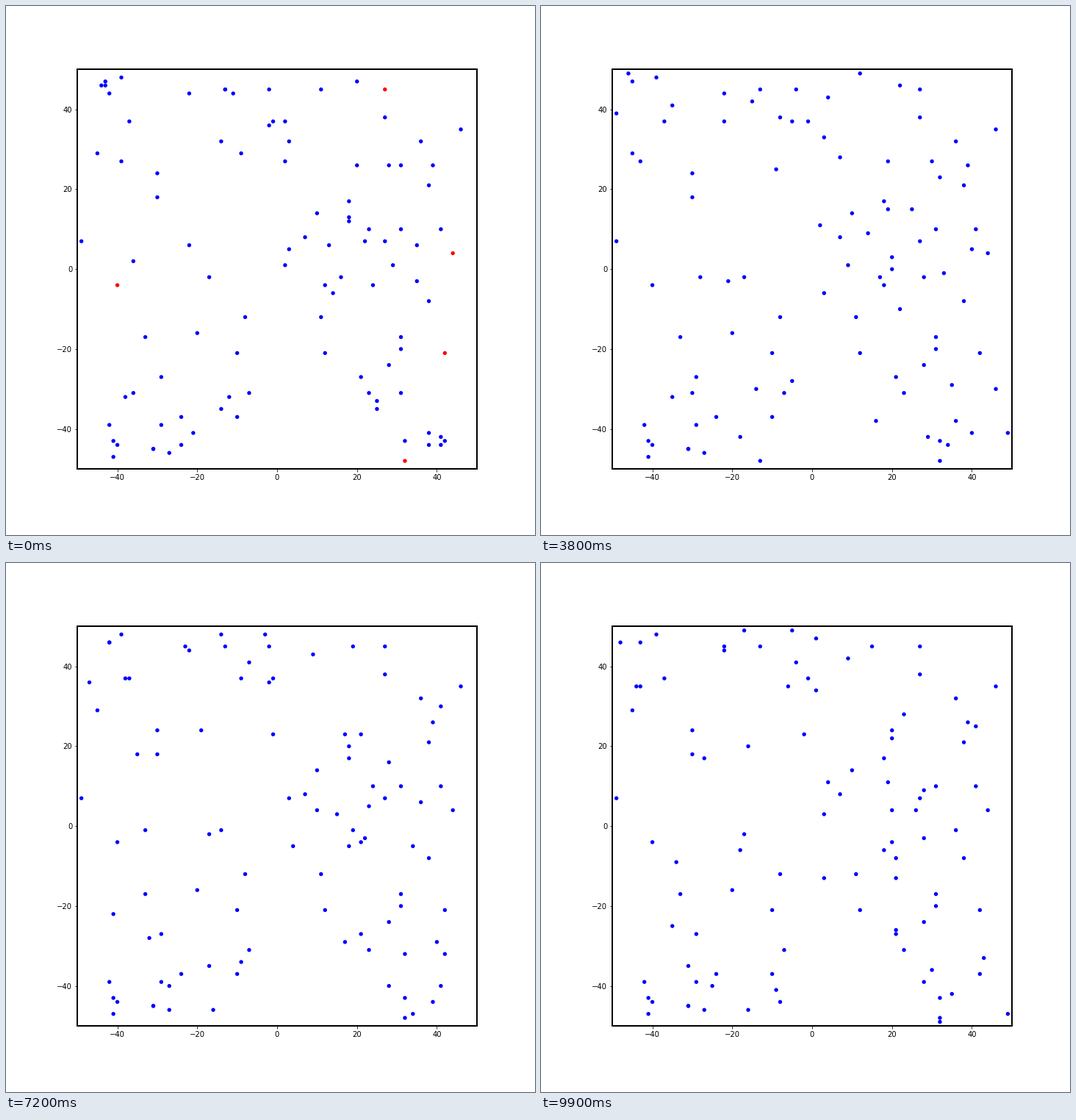
Recreate the animation shown at these times as a matplotlib script. Size 720 px wide and 720 px high, loop 10000 ms.

```python
import matplotlib.pyplot as plt
import numpy as np
from matplotlib.animation import FuncAnimation

FRAMES, INTERVAL = 100, 100
RECOVERY = 20
LIMIT = 50

# People who stay at home; the sick ones turn healthy after RECOVERY steps.
SICK = [(27, 45), (44, 4), (-40, -4), (42, -21), (32, -48)]
HOME = [
    (-39, 48), (-22, 44), (-13, 45), (27, 38), (46, 35), (36, 32), (39, 26),
    (38, 21), (-37, 37), (-1, 37), (-45, 29), (-30, 24), (-30, 18), (-49, 7),
    (10, 14), (18, 17), (7, 8), (31, 10), (41, 10), (27, 7), (-17, -2),
    (38, -8), (-8, -12), (11, -12), (-20, -16), (-33, -17), (31, -17),
    (31, -20), (-10, -21), (12, -21), (28, -24), (21, -27), (-29, -27),
    (23, -31), (-7, -31), (-10, -37), (-24, -37), (-29, -39), (-42, -39),
    (-41, -43), (-40, -44), (-41, -47), (-31, -45), (-31, -45), (-27, -46),
    (32, -43),
]

# Walkers set out from loose groups: size, centre and half extent.
GROUPS = [
    (4, (-43, 45), (1, 2)),
    (5, (-2, 45), (22, 3)),
    (6, (-1, 32), (14, 5)),
    (3, (28, 29), (8, 5)),
    (3, (-32, 16), (15, 14)),
    (14, (18, 4), (18, 12)),
    (6, (-26, -38), (16, 8)),
    (3, (24, -32), (9, 5)),
    (5, (42, -43), (4, 2)),
]

rng = np.random.default_rng(7)


def group(size, centre, half):
    spread = rng.uniform(-1, 1, (size, 2)) * half
    return np.rint(centre + spread).astype(int)


def random_walk(start):
    """Each step moves by -1, 0 or 1 on both axes, inside the walls."""
    path = [start]
    while len(path) < FRAMES:
        step = rng.integers(-1, 2, start.shape)
        path.append(np.clip(path[-1] + step, 1 - LIMIT, LIMIT - 1))
    return np.array(path)


still = np.array(SICK + HOME)
paths = random_walk(np.vstack([group(*g) for g in GROUPS]))
people = len(still) + paths.shape[1]

fig, ax = plt.subplots(figsize=(10, 10), dpi=72, facecolor="white")
fig.subplots_adjust(left=0.125, right=0.9, bottom=0.125, top=0.88)
ax.set(xlim=(-LIMIT, LIMIT), ylim=(-LIMIT, LIMIT), aspect="equal")
for spine in ax.spines.values():
    spine.set_linewidth(2)

dots = ax.scatter(*np.vstack([still, paths[0]]).T, s=15, linewidths=1.5,
                  c=["blue"] * people)


def update(i):
    sick = len(SICK) if i < RECOVERY else 0
    colors = ["red"] * sick + ["blue"] * (people - sick)
    dots.set_offsets(np.vstack([still, paths[i]]))
    dots.set_color(colors)
    return dots,


anim = FuncAnimation(fig, update, frames=FRAMES, interval=INTERVAL,
                     repeat=True, repeat_delay=0)
plt.show()
```
